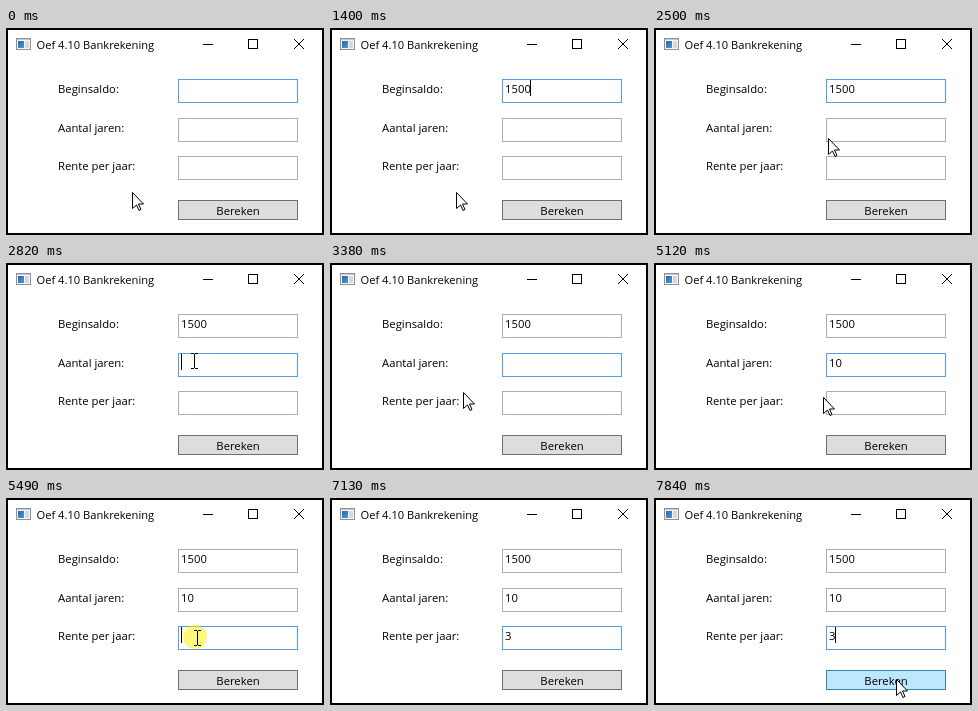
An HTML page with a canvas that plays this animation: 318 by 207 pixels, repeating every 8 s.

```html
<!DOCTYPE html>
<html lang="nl">
<head>
<meta charset="utf-8">
<title>Bankrekening</title>
<style>
  html, body { margin: 0; width: 318px; height: 207px; overflow: hidden; background: #fff; }
  canvas { display: block; }
</style>
</head>
<body>
<canvas id="stage" width="318" height="207"></canvas>
<script>
const ctx = document.getElementById('stage').getContext('2d');
const LOOP = 8000, STEP = 78.5;
const FONT = '"Open Sans", "Noto Sans", sans-serif';
const DIGIT = 6.47;

// y: top of the box; keys: [time, typed text]; focus: [from, to]
const fields = [
  { label: 'Beginsaldo:', y: 51, focus: [0, 2740],
    keys: [[0, ''], [280, '1'], [460, '15'], [1240, '150'], [1400, '1500']] },
  { label: 'Aantal jaren:', y: 90, focus: [2740, 5410],
    keys: [[0, ''], [4010, '1'], [4150, '10']] },
  { label: 'Rente per jaar:', y: 128, focus: [5410, LOOP],
    keys: [[0, ''], [6580, '3']] }
];
const caretOn = [[280, 1080], [1240, 2030], [2740, 3380], [3850, 4720],
                 [5410, 6040], [6510, 7130], [7660, LOOP]];
const clicks = [[2660, 2820], [5410, 5580]];

// Mouse moves: [time, x, y]
const moves = [
  [[2030, 126, 164], [2500, 174, 110], [2660, 188, 98], [2820, 188, 98], [3220, 133, 129]],
  [[4720, 133, 129], [5130, 170, 134], [5330, 191, 140]],
  [[7290, 191, 140], [7840, 242, 181]]
];

const within = (t, [a, b]) => t >= a && t < b;
const during = (t, spans) => spans.some(s => within(t, s));

function mouseAt(t) {
  const path = moves.filter(m => m[0][0] <= t).pop() || moves[0];
  const start = path[0][0];
  const q = start + Math.floor(Math.max(0, t - start + 3) / STEP) * STEP + 3;
  let i = 0;
  while (i < path.length - 2 && q >= path[i + 1][0]) i++;
  const [t0, x0, y0] = path[i], [t1, x1, y1] = path[i + 1];
  const k = Math.min(1, Math.max(0, (q - t0) / (t1 - t0)));
  return { x: Math.round(x0 + (x1 - x0) * k), y: Math.round(y0 + (y1 - y0) * k) };
}

function rect(x, y, w, h, color) {
  ctx.fillStyle = color;
  ctx.fillRect(x, y, w, h);
}

function box(x, y, w, h, fill, border) {
  rect(x, y, w, h, border);
  rect(x + 1, y + 1, w - 2, h - 2, fill);
}

function text(s, x, y, size = 11.3, align = 'left') {
  ctx.font = `${size}px ${FONT}`;
  ctx.textAlign = align;
  ctx.fillStyle = '#000';
  ctx.fillText(s, x, y);
}

function drawWindow() {
  rect(0, 0, 318, 207, '#000');
  rect(2, 2, 314, 203, '#fff');
  box(10, 10, 15, 12, '#f4f6f8', '#8b9199');
  rect(11, 11, 13, 1, '#c3c9d0');
  const g = ctx.createLinearGradient(12, 13, 18, 20);
  g.addColorStop(0, '#2f62b5');
  g.addColorStop(1, '#4d9bc4');
  rect(12, 13, 6, 7, g);
  rect(19, 13, 4, 7, '#d5d9de');
  text('Oef 4.10 Bankrekening', 30.5, 21, 11.15);
  rect(197, 16, 10, 1, '#000');
  box(242, 11, 10, 10, '#fff', '#000');
  ctx.strokeStyle = '#000';
  ctx.lineWidth = 1;
  ctx.beginPath();
  ctx.moveTo(288, 11); ctx.lineTo(298, 21);
  ctx.moveTo(298, 11); ctx.lineTo(288, 21);
  ctx.stroke();
}

function drawField(f, t, hover) {
  const focused = within(t, f.focus);
  const value = f.keys.filter(k => k[0] <= t).pop()[1];
  text(f.label, 52, f.y + 14);
  box(172, f.y, 120, 24, '#fff', focused ? '#569de5' : hover ? '#7eb4ea' : '#abadb3');
  text(value, 175, f.y + 14);
  if (focused && during(t, caretOn))
    rect(Math.floor(175 + value.length * DIGIT), f.y + 1, 1, 16, '#000');
}

function drawArrow(x, y) {
  const pts = [[0, 0], [0, 16], [4, 12.5], [6.5, 18], [8.5, 17], [6, 11.5], [11, 11.5]];
  ctx.beginPath();
  for (const [px, py] of pts) ctx.lineTo(x + px + 0.5, y + py + 0.5);
  ctx.closePath();
  ctx.fillStyle = '#fff';
  ctx.fill();
  ctx.strokeStyle = '#000';
  ctx.lineWidth = 1;
  ctx.stroke();
}

function drawBeam(x, y) {
  rect(x, y - 7, 1, 14, '#000');
  for (const sy of [y - 8, y + 7]) {
    rect(x - 3, sy, 3, 1, '#000');
    rect(x + 1, sy, 3, 1, '#000');
  }
}

function draw(t) {
  const m = mouseAt(t);
  const hidden = within(t, [6580, 7290]);
  const over = (y, h) => !hidden && m.x > 175 && m.x < 292 && m.y >= y && m.y < y + h;
  const hovered = fields.find(f => over(f.y, 24));

  drawWindow();
  for (const f of fields) drawField(f, t, f === hovered);
  const hot = over(172, 20);
  box(172, 172, 120, 20, hot ? '#bee6fd' : '#ddd', hot ? '#3c7fb1' : '#707070');
  text('Bereken', 232, 187, 11.3, 'center');

  if (hidden) return;
  if (during(t, clicks)) {
    ctx.fillStyle = 'rgba(255, 240, 0, 0.52)';
    ctx.beginPath();
    ctx.arc(m.x - 2, m.y - 1, 12, 0, Math.PI * 2);
    ctx.fill();
  }
  if (hovered) drawBeam(m.x, m.y);
  else drawArrow(m.x, m.y);
}

const begin = performance.now();
function tick() {
  draw((performance.now() - begin) % LOOP);
  requestAnimationFrame(tick);
}
tick();
</script>
</body>
</html>
```
